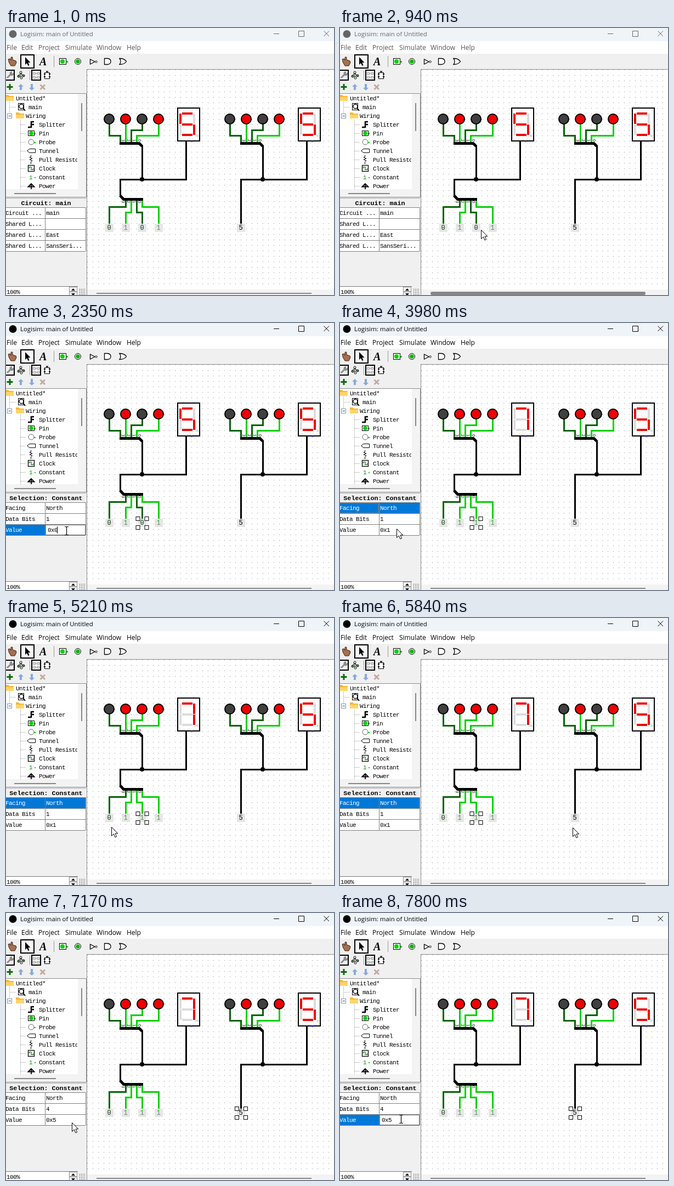
Animation of 598x487 px, one loop 8000 ms. Source, as an HTML page:

```html
<!DOCTYPE html>
<html lang="en">
<head>
<meta charset="utf-8">
<title>Circuit editor</title>
<style>
html, body { margin: 0; width: 100%; height: 100%; overflow: hidden; background: #f0f0f0; }
svg { display: block; width: 598px; height: 487px; }
text { white-space: pre; }
.ui { font: 12px "Open Sans", "Noto Sans", sans-serif; }
.title { font-size: 11.4px; }
.mono { font: 11px "Liberation Mono", monospace; letter-spacing: -.6px; }
.head { font: bold 11.7px "Liberation Mono", monospace; text-anchor: middle; }
.digit { font: 12px "Liberation Mono", monospace; text-anchor: middle; }
.tiny { font: 7px "DejaVu Sans", sans-serif; text-anchor: middle; }
.crisp { shape-rendering: crispEdges; }
.line { fill: none; stroke: #000; }
.wire { fill: none; stroke-width: 3; }
</style>
</head>
<body>
<svg viewBox="0 0 598 487" id="stage"></svg>
<script>
const LOOP = 8000, STEP = 79;
const OFF = '#006400', ON = '#00d200', RED = '#f00000', BLUE = '#0078d7';
const ACTIVE = 1250, SELECT_BIT = 1330, EDIT_BIT = 2190, COMMIT = 3980, SELECT_BUS = 6320, EDIT_BUS = 7270;

const rect = (x, y, w, h, fill, more = '') => `<rect x="${x}" y="${y}" width="${w}" height="${h}" fill="${fill}" ${more}/>`;
const frame = (x, y, w, h, color = '#000', width = 1, fill = 'none') => rect(x, y, w, h, fill, `stroke="${color}" stroke-width="${width}"`);
const path = (d, more = '') => `<path d="${d}" ${more}/>`;
const line = (d, width = 1, color = '#000') => path(d, `fill="none" stroke="${color}" stroke-width="${width}"`);
const circle = (x, y, r, fill, more = '') => `<circle cx="${x}" cy="${y}" r="${r}" fill="${fill}" ${more}/>`;
const text = (x, y, s, cls = 'mono', fill = '#000') => `<text x="${x}" y="${y}" class="${cls}" fill="${fill}">${s}</text>`;
const during = (from, to, body) => `<g data-from="${from}" data-to="${to}">${body}</g>`;
const wire = (d, color = '#000') => path(d, `class="wire crisp" stroke="${color}"`);

function windowBar(color, soft) {
  const menus = [[1, 'File'], [28, 'Edit'], [59, 'Project'], [108, 'Simulate'], [165, 'Window'], [220, 'Help']];
  return circle(12.5, 11, 7, color) +
    text(26, 15, 'Logisim: main of Untitled', 'ui title', color) +
    line('M488 10.5H498M533.5 5.5H543.5V15.5H533.5ZM579.5 5.5L589 15M589 5.5L579.5 15', 1, color) +
    menus.map(([x, s]) => text(x, 40, s, 'ui', soft)).join('');
}

function toolbars() {
  const gate = 'fill="#fff" stroke="#000" stroke-width="1.3"';
  return path('M5 60L4 57L7 56L9 59V53.5Q10.5 52 12 53.5V58L18 60Q20 62 18 65L16 69H9L5 62Z', 'fill="#a86f4c" stroke="#3a2114"') +
    frame(27, 49, 24, 24, '#000', 2, '#f7f7f7') +
    path('M35 53V67L38 64L40.5 69L42.5 68L40.5 63H44.5Z') +
    `<text x="61" y="68" font-family="Liberation Serif, serif" font-size="20" font-weight="bold" font-style="italic">A</text>` +
    line('M87.5 51V71M43.5 78V95', 1, '#999') +
    frame(97.5, 55.5, 12, 11, '#000', 1, '#fff') + circle(103, 61, 4, ON) + path('M110 60h3v3h-3z', `fill="${ON}"`) +
    circle(131, 61, 5.5, '#fff', 'stroke="#000"') + circle(131, 61, 3.8, '#00b800') +
    path('M153.5 57V66L162 61.5Z', gate) + circle(164.5, 61.5, 1.7, '#fff', 'stroke="#000"') +
    path('M179.5 55.5H185Q191 56 191 61T185 66.5H179.5Z', gate) +
    path('M207 55.5Q216 55.5 219.5 61Q216 66.5 207 66.5Q211 61 207 55.5Z', gate) +
    frame(-1, 77, 16, 18, '#000', 2) +
    line('M2 91L9 84', 3, '#8c8c8c') + path('M7 85A4 4 0 0 1 11 79V83L14 82A4 4 0 0 1 9 87Z', 'fill="#8c8c8c"') +
    line('M27 81L22 89M27 81L31 88M27 82V91', 1) + circle(27, 81, 2, '#fff', 'stroke="#000"') +
    circle(23, 88, 2, '#5aa052', 'stroke="#000"') + circle(28, 91, 2, '#fff', 'stroke="#000"') + circle(32, 87, 2, '#5aa052', 'stroke="#000"') +
    frame(47, 77, 16, 18, '#000', 2) +
    line('M49.5 81.5h4v3h-4zM57 81.5h4v3h-4zM49.5 88.5h4v3h-4zM57 88.5h4v3h-4zM53 83H57M53 90H57', 1, '#999') +
    frame(70.5, 81.5, 9, 11, '#000', 1, '#fff') + line('M69 84H72M69 89H72M78 84H81M78 89H81M73 79.5H77', 2) +
    line('M7 102V113M1.5 107.5H12.5', 3, '#0a6b0a') +
    path('M27 102L32 107H29V113H25V107H22ZM47 114L42 109H45V102H49V109H52Z', 'fill="#85a9e4"') +
    line('M62.5 103.5L71 112M71 103.5L62.5 112', 3, '#c4aaa0');
}

function folder(x, y) {
  return path(`M${x} ${y}h5l2 2h8v9h-15z`, 'fill="#f7b733"') + path(`M${x} ${y + 4}h15v7h-15z`, 'fill="#ffd56a"');
}

function tree() {
  const parts = ['Splitter', 'Pin', 'Probe', 'Tunnel', 'Pull Resistor', 'Clock', 'Constant', 'Power'];
  const stubs = parts.map((_, i) => `M26.5 ${176.5 + 16 * i}H36`).join('');
  const icons =
    line('M46 170V182M46 171H51M46 176H51M40 181H46', 2.5) +
    frame(40.5, 187.5, 11, 9, '#000', 1, '#fff') + circle(46, 192, 3.8, ON) + rect(52, 191, 2, 3, ON) +
    circle(46, 208, 5, '#fff', 'stroke="#666"') + rect(51, 208, 3, 2, ON) +
    path('M38.5 224L43 220.5H53.5V227.5H43Z', 'fill="#fff" stroke="#000"') +
    line('M45.5 232V235L43 236L48 238L43 240L48 242L45.5 244V248') +
    frame(40.5, 250.5, 11, 11, '#000', 1.3, '#fff') + line('M42.5 256V253.5H46V258.5H49.5V256', 1.2, '#087008') +
    text(42, 276, '1', 'mono', '#009600') + rect(52, 272, 2, 2, ON) +
    line('M46 294V284M40.5 289.5L46 284L51.5 289.5Z', 1.8);
  return rect(0, 120, 146, 188, '#fff') + rect(131, 120, 15, 188, '#f3f3f3') + rect(0, 294, 146, 14, '#f3f3f3') +
    line('M0 119.5H146.5V308.5H0', 1, '#8c8c8c') +
    `<clipPath id="list"><path d="M0 120H130V294H0Z"/></clipPath><g clip-path="url(#list)">` +
    path(`M6.5 134V156M6.5 144.5H18M26.5 167V294${stubs}`, 'class="line" style="stroke:#999;stroke-dasharray:1 1"') +
    folder(-1, 122) + text(18, 132, 'Untitled*') +
    frame(22.5, 137.5, 10, 12, '#000', 1, '#fff') + circle(28, 143, 4, '#fff', 'stroke="#000" stroke-width="1.5"') + line('M31 146L35 151', 2) +
    text(41, 148, 'main') +
    frame(2.5, 156.5, 8, 8, '#8090b0', 1, '#fff') + line('M4.5 160.5H9', 1, '#23449a') +
    folder(18, 154) + text(36, 164, 'Wiring') + icons +
    parts.map((s, i) => text(60, 180 + 16 * i, s)).join('') + '</g>' +
    rect(137, 137, 2, 51, '#868686') + rect(15, 301, 76, 2, '#868686');
}

function table(from, to, title, rows, blueRow = -1) {
  const bottom = 327 + 20 * rows.length;
  let s = text(73, 323, title, 'head') + rect(0, 327, 146, bottom - 327, '#fff');
  rows.forEach(([name, value], i) => {
    const y = 327 + 20 * i, ink = i === blueRow ? '#fff' : '#000';
    if (i === blueRow) s += rect(0, y, 145, 20, BLUE);
    s += text(-1, y + 14, name, 'mono', ink) + text(73, y + 14, value, 'mono', ink) + line(`M0 ${y + 20.5}H145`, 1, '#808080');
  });
  return during(from, to, s + line(`M0 327.5H145.5V${bottom}M71.5 327V${bottom}`, 1, '#808080'));
}

function editor(from, to) {
  return during(from, to, rect(0, 368, 71, 19, BLUE) + text(-1, 381, 'Value', 'mono', '#fff') + frame(72.5, 368.5, 72, 18, '#777', 1, '#fff'));
}
const typed = (from, to, s) => during(from, to, text(76, 381, s));
const caret = (from, to, x) => during(from, to, rect(x, 371, 1, 13, '#000'));

function properties() {
  const constant = (bits, value) => [['Facing', 'North'], ['Data Bits', bits], ['Value', value]];
  const title = 'Selection: Constant';
  return line('M0 310.5H146', 1, '#aaa') +
    table(0, SELECT_BIT, 'Circuit: main', [['Circuit ...', 'main'], ['Shared L...', ''], ['Shared L...', 'East'], ['Shared L...', 'SansSeri...']]) +
    table(SELECT_BIT, COMMIT, title, constant('1', '0x0')) +
    table(COMMIT, SELECT_BUS, title, constant('1', '0x1'), 0) +
    during(COMMIT, 5050, path('M0 328.5H70.5V346.5H0', 'class="line" style="stroke:#ff8728;stroke-dasharray:1 1"')) +
    table(SELECT_BUS, LOOP, title, constant('4', '0x5')) +
    editor(EDIT_BIT, COMMIT) + typed(EDIT_BIT, 3520, '0x0') + typed(3520, 3680, '0x') + typed(3680, COMMIT, '0x1') +
    caret(EDIT_BIT, 2740, 93) + caret(3280, 3520, 93) + caret(3520, 3680, 87) + caret(3680, COMMIT, 93) +
    editor(EDIT_BUS, LOOP) + typed(EDIT_BUS, LOOP, '0x5') + caret(EDIT_BUS, 7720, 93);
}

function zoomBar() {
  let dots = '';
  for (let x = 134; x < 146; x += 3) for (let y = 476; y < 487; y += 3) dots += `M${x} ${y}h1v1h-1z`;
  return rect(0, 472, 114, 15, '#fff') + line('M0 471.5H131', 1, '#777') + text(1, 485, '100%') +
    frame(115.5, 472.5, 14, 8, '#999', 1, '#f5f5f5') + frame(115.5, 481.5, 14, 8, '#999', 1, '#f5f5f5') +
    path('M119 479L122.5 475L126 479ZM119 484H126L122.5 488Z') + path(dots);
}

// Segment order: top, upper right, lower right, bottom, lower left, upper left, middle
function hexDigit(x, lit) {
  const bars = [[8, 8, 1], [28, 10], [28, 30], [8, 47, 1], [3, 30], [3, 10], [8, 28, 1]];
  return frame(x, 146, 40, 60, '#000', 2, '#fff') +
    bars.map(([dx, dy, flat], i) => rect(x + dx, 146 + dy, flat ? 19 : 4, flat ? 4 : 19, lit[i] === '1' ? RED : '#dcdcdc')).join('') +
    circle(x + 35.5, 196.5, 2.5, '#dcdcdc') + rect(x + 24, 206, 3, 2, '#4646ff');
}

const labels = (x, y) => [3, 2, 1, 0].map((n, i) => `<text class="tiny" transform="translate(${x + 10 * i} ${y}) rotate(90)">${n}</text>`).join('');

function outputs(x, bits, digit) {
  const routes = ['V196H208V210', 'V210', 'V186H228V210', 'V196H238V210'];
  const shift = x - 188;
  return `<g transform="translate(${shift})">` +
    routes.map((d, i) => wire(`M${188 + 30 * i} 175${d}`, bits[i] === '1' ? ON : OFF)).join('') +
    [...bits].map((b, i) => circle(188 + 30 * i, 166, 9, b === '1' ? RED : '#404040', 'stroke="#000" stroke-width="2"')).join('') +
    hexDigit(313, digit) + labels(211, 205) +
    wire('M248 214V276M328 207V276H207') + line('M207 210.5H243L248 215.5', 5) + circle(248, 276, 4, '#000') + '</g>';
}

const constant = (x, value, ink) => rect(x - 7, 357, 15, 15, '#e6e6e6') + text(x, 368, value, 'digit', ink);

function inputs(bits) {
  const routes = ['M218 312V326H188V357', 'M228 312V336H218V357', 'M238 312V336H248V357', 'M248 312V326H278V357'];
  return [...bits].map((b, i) => wire(routes[i], b === '1' ? ON : OFF) +
    constant(188 + 30 * i, b, b === '1' ? '#4f944f' : '#123f12')).join('');
}

function handles(x) {
  return [-8, 8].map(dx => [357, 373].map(y => frame(x + dx - 3.5, y - 3.5, 7, 7, '#000', 1, '#fff')).join('')).join('');
}

function circuit() {
  const five = '1011011', seven = '1110000';
  return rect(148, 76, 450, 411, '#fff') +
    `<pattern id="grid" x="148" y="76" width="10" height="10" patternUnits="userSpaceOnUse">${rect(0, 0, 1, 1, '#888')}</pattern>` +
    rect(148, 76, 450, 400, 'url(#grid)') + line('M147.5 487V75.5H598', 1, '#8c8c8c') +
    during(0, COMMIT, outputs(188, '0101', five) + inputs('0101')) +
    during(COMMIT, LOOP, outputs(188, '0111', seven) + inputs('0111')) +
    outputs(408, '0101', five) +
    wire('M208 275V306M428 275V357') + line('M208 305.5L214.5 312.5H250', 5) + labels(211, 317) +
    constant(428, '5', '#000') +
    during(SELECT_BIT, SELECT_BUS, handles(248.5)) + during(SELECT_BUS, LOOP, handles(429)) +
    rect(148, 477, 450, 10, '#f3f3f3') +
    during(0, 390, rect(165, 483, 392, 2, '#868686')) + during(1560, LOOP, rect(165, 483, 392, 2, '#868686')) +
    during(390, 1560, rect(165, 481, 392, 6, '#868686', 'rx="3"'));
}

const pointers =
  `<g id="arrow">${path('M.5 .5V16.5L4.3 13L7 19L9.6 17.8L7 12H11.8Z', 'fill="#fff" stroke="#000" stroke-linejoin="round"')}</g>` +
  `<g id="beam">${line('M-3 -7.5H-.5L.5 -6.5L1.5 -7.5H4M.5 -7V7M-3 7.5H-.5L.5 6.5L1.5 7.5H4', 1.2)}</g>`;

const stage = document.getElementById('stage');
stage.innerHTML = rect(0, 0, 598, 487, '#f0f0f0') + rect(0, 0, 598, 24, '#eff4f9') + rect(0, 24, 598, 23, '#fff') +
  during(0, ACTIVE, windowBar('#666', '#555')) + during(ACTIVE, LOOP, windowBar('#000', '#000')) +
  toolbars() + tree() + properties() + zoomBar() + circuit() + pointers;

// Pointer stops: time, x, y
const stops = [
  [390, 340, 480], [940, 257, 368], [1170, 250, 364], [1250, 248, 365], [1720, 248, 365],
  [2190, 116, 377], [2350, 110, 379], [3979, 110, 379], [COMMIT, 103, 375], [4971, 103, 375],
  [5445, 280, 387], [5840, 424, 382], [6160, 428, 362], [6470, 428, 362], [6550, 435, 368],
  [6870, 125, 385], [6951, 125, 385], [7270, 114, 378], [7570, 113, 377], [7641, 113, 377], [7800, 111, 376], [LOOP, 111, 376]
];

function pointerAt(t) {
  const i = stops.findLastIndex(s => s[0] <= t);
  const [t0, x0, y0] = stops[i], [t1, x1, y1] = stops[i + 1];
  const k = Math.floor((t - t0) / STEP) * STEP / (t1 - t0);
  return [Math.round(x0 + (x1 - x0) * k), Math.round(y0 + (y1 - y0) * k)];
}

const timed = [...stage.querySelectorAll('[data-from]')];
const arrow = document.getElementById('arrow'), beam = document.getElementById('beam');
const show = (el, visible) => { el.style.display = visible ? '' : 'none'; };

function draw() {
  const t = performance.now() % LOOP;
  for (const el of timed) show(el, t >= +el.dataset.from && t < +el.dataset.to);
  const editing = (t >= EDIT_BIT && t < COMMIT) || t >= EDIT_BUS;
  show(arrow, t >= 390 && !editing);
  show(beam, editing);
  if (t >= 390) (editing ? beam : arrow).setAttribute('transform', `translate(${pointerAt(t)})`);
  requestAnimationFrame(draw);
}
draw();
</script>
</body>
</html>
```
